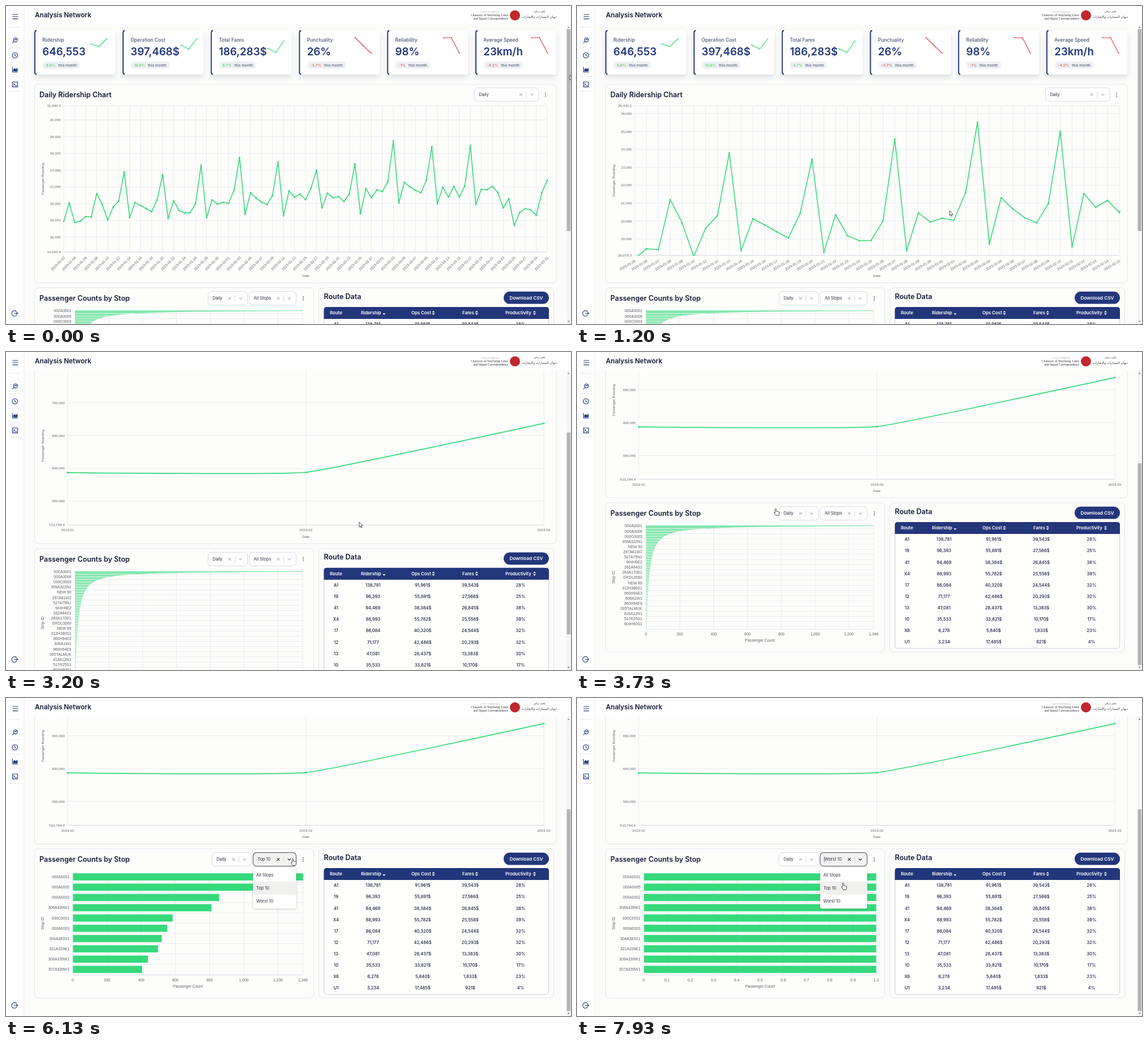
Animation of 998 by 561 pixels, one loop 8000 ms. Source, as an HTML page:

```html
<!DOCTYPE html>
<html lang="en">
<head>
<meta charset="utf-8">
<title>Analysis Network</title>
<style>
  html, body { margin: 0; width: 100%; height: 100%; overflow: hidden; background: #fcfcfb; }
  svg { display: block; width: 100vw; height: 100vh; font-family: Inter, sans-serif; }
  .axis { font-family: "Liberation Sans", Arial, sans-serif; fill: #5f616a; }
  .serif { font-family: "Liberation Serif", serif; fill: #33343c; }
  .arabic { font-family: "DejaVu Sans", sans-serif; fill: #33343c; }
  .card { filter: drop-shadow(0 5px 4px #1b254b22); }
  .menu { filter: drop-shadow(0 1px 2px #0003); }
</style>
</head>
<body>
<svg viewBox="0 0 998 561">
  <defs>
    <clipPath id="page"><rect x="32" y="33" width="958" height="528"/></clipPath>
    <clipPath id="bars"><rect x="118" y="306.5" width="412" height="183"/></clipPath>
    <linearGradient id="fade" x2="0" y2="1">
      <stop stop-color="#36d97b" stop-opacity=".62"/>
      <stop offset=".35" stop-color="#36d97b" stop-opacity=".5"/>
      <stop offset="1" stop-color="#36d97b" stop-opacity=".25"/>
    </linearGradient>
  </defs>
  <rect width="998" height="561" fill="#fcfcfb"/>
  <g clip-path="url(#page)">
    <g id="content">
      <g id="cards"></g>
      <g id="ridership"></g>
      <g transform="translate(0 231)">
        <g id="routes"></g>
        <g id="stops"></g>
      </g>
    </g>
  </g>
  <g id="frame"></g>
  <g id="scrollbar"></g>
  <g id="cursor"></g>
</svg>
<script>
const LOOP = 8000, SCROLL = 231;
const NAVY = '#22367a', INK = '#161b36', GREEN = '#36d97b', RED = '#e0434c', GRID = '#e1e4f0', EDGE = '#e4e6ee';

// Time helpers
const lerp = (a, b, p) => a + (b - a) * p;
const span = (t, a, b) => Math.min(1, Math.max(0, (t - a) / (b - a)));
const smooth = p => p * p * (3 - 2 * p);
const quadOut = p => 1 - (1 - p) ** 2;
const within = (t, a, b) => t >= a && t < b;

// Drawing helpers; text is centred vertically on y
const n = v => +v.toFixed(2);
const text = (x, y, s, size, more = '') =>
  `<text x="${n(x)}" y="${n(y + size * .36)}" font-size="${size}" ${more}>${s}</text>`;
const rect = (x, y, w, h, fill, more = '') =>
  `<rect x="${n(x)}" y="${n(y)}" width="${n(w)}" height="${n(h)}" fill="${fill}" ${more}/>`;
const path = (d, color, width = 1, more = '') =>
  `<path d="${d}" fill="none" stroke="${color}" stroke-width="${width}" ${more}/>`;
const line = (x1, y1, x2, y2, color = GRID, width = .7) =>
  path(`M${n(x1)} ${n(y1)}L${n(x2)} ${n(y2)}`, color, width);
const dot = (x, y, r, fill) => `<circle cx="${n(x)}" cy="${n(y)}" r="${r}" fill="${fill}"/>`;
const poly = pts => 'M' + pts.map(p => p.map(n).join(' ')).join('L');
const panel = (x, y, w, h) => rect(x, y, w, h, '#fdfdfb', `rx="7" stroke="${EDGE}"`);
const heading = (x, y, s) => text(x, y, s, 12.5, `font-weight="600" fill="${INK}"`);
const axis = (x, y, s, anchor, size = 6.24, more = '') =>
  text(x, y, s, size, `class="axis" text-anchor="${anchor}" ${more}`);
const upright = (x, y, s, size) => axis(x, y, s, 'middle', size, `transform="rotate(-90 ${x} ${y})"`);
const kebab = (x, y) => [-3, 0, 3].map(d => dot(x, y + d, .85, '#4a4f63')).join('');
const num = v => v.toLocaleString('en-US', { maximumFractionDigits: 2 });

const cache = {};
function put(id, html) {
  if (cache[id] !== html) document.getElementById(id).innerHTML = cache[id] = html;
}

function select(x, w, y, label, focus, caret) {
  const r = x + w, c = focus ? '#33353f' : '#b4b8c6';
  return rect(x, y - 12, w, 24, focus ? '#f2f2f1' : '#fefefe',
      `rx="6" stroke="${focus ? '#6b6d76' : '#d3d6e2'}" stroke-width="${focus ? 1.3 : .9}"`) +
    text(x + 8, y, label, 7.4, 'fill="#2c3040"') +
    (caret ? line(x + 7.5, y - 4.5, x + 7.5, y + 4.5, '#222', .7) : '') +
    path(`M${r - 34} ${y - 2.4}l4.8 4.8m0 -4.8l-4.8 4.8`, c, 1.1) +
    line(r - 22, y - 5.5, r - 22, y + 5.5, '#cfd2dd', .8) +
    path(`M${r - 14.7} ${y - 1.2}l2.6 2.6l2.6 -2.6`, c, 1.2);
}

function menu(x, w, y, items, hot) {
  return `<g class="menu">${rect(x, y, w, items.length * 22.8 + 4, '#fff', 'rx="3"')}</g>` +
    items.map((s, i) => {
      const cy = y + 13.4 + i * 22.8;
      return (i === hot ? rect(x, cy - 11.4, w, 22.8, '#f0f0ef') : '') +
        text(x + 5.5, cy, s, 7.4, 'fill="#2c3040"');
    }).join('');
}

// Summary cards: label, value, change, pill width, sparkline heights and offset
const cards = [
  ['Ridership', '646,553', '8.6%', 65.5, [67, 71.5, 58], 100],
  ['Operation Cost', '397,468$', '10.8%', 68.5, [69, 76, 58], 103],
  ['Total Fares', '186,283$', '8.7%', 65, [75, 82, 62], 101],
  ['Punctuality', '26%', '-3.7%', 68, [56, 70, 83], 99.5],
  ['Reliability', '98%', '-1%', 61, [56, 56, 83], 99.5],
  ['Average Speed', '23km/h', '-4.2%', 68.5, [56, 56, 83], 99.5],
];
function drawCards() {
  return cards.map(([label, value, change, pill, ys, dx], i) => {
    const x = 50 + i * 155.8, color = change[0] === '-' ? RED : GREEN;
    const pts = ys.map((y, k) => [x + dx + k * 14, y]);
    return `<g class="card">${rect(x, 43, 143, 78, '#fff', 'rx="4"')}</g>` +
      path(`M${n(x + 4)} 43.5Q${n(x + 1)} 43.5 ${n(x + 1)} 47V117Q${n(x + 1)} 120.5 ${n(x + 4)} 120.5`, NAVY, 1.9) +
      text(x + 14.3, 60, label, 8.5, 'font-weight="500" fill="#4b5372"') +
      text(x + 14.3, 80.7, value, 18.7, `font-weight="600" fill="${NAVY}"`) +
      rect(x + 15, 98, pill, 12.5, '#eef0f4', 'rx="5"') +
      text(x + 20.5, 104.2, `<tspan font-weight="600" fill="${change[0] === '-' ? '#e26a62' : '#68cf76'}">${change}</tspan>` +
        '<tspan dx="5">this month</tspan>', 6.5, 'font-weight="500" fill="#596079"') +
      path(poly(pts), color, 1.2) + pts.map(p => dot(...p, 1.1, color)).join('');
  }).join('');
}

// Daily boardings in tens, from 2 January to 31 March
const daily = [
  1790, 2010, 1775, 1790, 1845, 1840, 2120, 1990, 1803, 1960, 2030, 2380, 1835, 2013, 1978, 1940,
  1905, 2045, 2345, 1825, 2035, 1918, 1890, 1892, 2000, 2458, 1835, 2045, 1995, 2015, 2004, 2160,
  2552, 1872, 2130, 2067, 2018, 1990, 2098, 2500, 1856, 2153, 2077, 2115, 2048, 2185, 2398, 1950,
  2125, 2070, 2085, 2025, 2120, 2475, 1880, 2180, 2070, 2165, 2145, 2265, 2750, 2010, 2255, 2200,
  2160, 2130, 2280, 2680, 2000, 2195, 2080, 2205, 2080, 2210, 2695, 1990, 2170, 2165, 2205, 2135,
  1950, 2060, 1740, 1895, 1940, 1925, 1860, 2130, 2280];
const dayName = i => new Date(Date.UTC(2023, 0, 2 + i)).toISOString().slice(0, 10);

function yAxis(lo, hi, step, left, right, bottom) {
  const Y = v => lerp(bottom, 176, (v - lo) / (hi - lo));
  let out = '';
  const tick = v => {
    out += line(left, Y(v), right, Y(v)) + axis(left - 5.3, Y(v), num(v), 'end');
  };
  tick(lo);
  tick(hi);
  for (let v = Math.ceil(lo / step) * step; v < hi; v += step)
    if (Math.min(bottom - Y(v), Y(v) - 176) > 8) tick(v);
  out += line(left, bottom, right, bottom, '#cdd0da') + upright(65, (176 + bottom) / 2, 'Passenger Boarding', 6.24);
  return [Y, out];
}

function dailyChart(t) {
  const z = smooth(span(t, 700, 1150));
  const a = lerp(0, 3, z), b = lerp(88, 44, z), wide = b - a > 60, skip = wide ? 2 : 1;
  const left = 102, right = lerp(956, 958, z), bottom = wide ? 434 : 440;
  const lo = Math.round(lerp(142204, 180793, z)) / 10, hi = Math.round(lerp(316904, 264351, z)) / 10;
  const X = i => lerp(left, right, (i - a) / (b - a));
  let [Y, out] = yAxis(lo, hi, hi - lo > 12000 ? 2000 : 1000, left, right, bottom);
  for (let i = Math.ceil(a / skip) * skip; i <= b + .01; i += skip) {
    const x = n(X(i)), y = bottom + 9;
    out += line(x, 176, x, bottom) +
      axis(x + 1, y, dayName(i), 'end', 6.24, `transform="rotate(${wide ? -45 : -30} ${x + 1} ${y})"`);
  }
  const pts = daily.map((v, i) => [X(i), Y(v * 10)]);
  return out + `<clipPath id="plot">${rect(left - 1.5, 174, right - left + 3, bottom - 173, '#000')}</clipPath>` +
    `<g clip-path="url(#plot)">${path(poly(pts), GREEN, 1.6, 'stroke-linejoin="round"')}` +
    pts.map(p => dot(...p, 1.5, GREEN)).join('') + '</g>';
}

function monthlyChart(t) {
  let [, out] = yAxis(513794.4, 754919.02, 50000, 109, 950, 455.5);
  [109, 529.7, 950].forEach((x, i) => {
    out += line(x, 176, x, 455.5) + axis(x, 464.5, `2023-0${i + 1}`, 'middle');
  });
  const p = span(t, 2400, 3000);
  const y0 = lerp(346, 363.2, p), x1 = lerp(150, 530, p), y1 = lerp(361.9, 362.6, p);
  const x2 = lerp(x1, 950, p * p), y2 = lerp(y1, 276.2, p * p);
  // Only the middle point has handles, along the line between its neighbours
  const hx = (x2 - 109) * .05 * p, hy = (y2 - y0) * .05 * p;
  const d = `M109 ${n(y0)}C109 ${n(y0)} ${n(x1 - hx)} ${n(y1 - hy)} ${n(x1)} ${n(y1)}` +
    `C${n(x1 + hx)} ${n(y1 + hy)} ${n(x2)} ${n(y2)} ${n(x2)} ${n(y2)}`;
  return out + path(d, GREEN, 1.7) + [[109, y0], [x1, y1], [x2, y2]].map(q => dot(...q, 1.6, GREEN)).join('');
}

function drawRidership(t) {
  const kind = t < 2400 ? 'Daily' : 'Monthly', open = within(t, 2030, 2400);
  return panel(50.5, 138, 921.5, 350.5) + heading(59, 156, kind + ' Ridership Chart') + kebab(953, 156.3) +
    (t < 2400 ? dailyChart(t) : monthlyChart(t)) + axis(529.5, 475.7, 'Date', 'middle') +
    select(827.5, 113.5, 156.2, kind, within(t, 2030, 4300)) +
    (open ? menu(827.5, 113.5, 170.7, ['Daily', 'Monthly'], t < 2230 ? 0 : 1) : '');
}

// Stop chart
const allStops = ('000A0001,000A0006,000C0003,309A322N1,NEW 90,297A81W2,527A79N1,904H6E2,262A64S1,263A170E1,' +
  'GRDL0060,NEW 89,312H380S1,960H94E3,608A1W1,960H94E9,005TALMUK,816A12N1,517R25S1,604H60S1').split(',');
const topStops = '000A0001,000A0005,000A0002,306A339W1,000C0001,000A0003,304A383S1,321A339E1,308A339W1,307A339W1'.split(',');
const topCounts = [1346, 1160, 855, 810, 583, 551, 519, 498, 439, 404];

function stopGrid(left, right, max, step, names, first, pitch, labelX) {
  let out = '';
  names.forEach((s, i) => {
    const y = first + pitch * i;
    out += line(left, y + pitch / 2, right, y + pitch / 2) + axis(labelX, y, s, 'end', 6.8);
  });
  const ticks = [];
  for (let v = 0; v < max - step / 4; v += step) ticks.push(v);
  [...ticks, max].forEach(v => {
    const x = lerp(left, right, v / max);
    out += line(x, 306.5, x, 489) +
      axis(x, 497.3, max > 1 ? num(v) : v ? v.toFixed(1) : '0', 'middle', 6.8);
  });
  return out + line(left, 489, right, 489, '#d5d8e2') +
    axis((left + right) / 2, 508.3, 'Passenger Count', 'middle', 6.8) + upright(65, 397.5, 'Stop ID', 6.8);
}

function allChart() {
  const width = y => Math.max(.2, 402 / (1 + .62 * (y - 307)) - (y - 307) / 60);
  const edge = [];
  for (let y = 307; y <= 488; y += y < 330 ? .5 : 4) edge.push([122 + width(y), y]);
  let stripes = '';
  for (let y = 311.5; y < 480; y += 4.55) stripes += line(122, y, 122 + width(y), y, '#fdfdfb', .8);
  return stopGrid(122, 524, 1346, 200, allStops, 307, 9.1, 115.3) +
    `<path d="${poly([[122, 306], [524, 306], ...edge, [122, 488]])}Z" fill="url(#fade)"/>` + stripes;
}

function rankChart(t) {
  const worst = t >= 6550, e = quadOut(span(t, 4990, 5362)), g = quadOut(span(t, 6550, 7150));
  const bars = topCounts.map((v, i) => {
    const y = 315.6 + 18.13 * i - (1 - e) * (93 + 18.13 * i), h = 12.6 * e;
    return rect(118.3, y - h / 2, lerp(v * .302, 410.2, g), h, GREEN);
  }).join('');
  return (worst ? stopGrid(118, 528.5, 1, .1, topStops, 315.6, 18.13, 112)
    : stopGrid(118, 524.5, 1346, 200, topStops, 315.6, 18.13, 112)) + `<g clip-path="url(#bars)">${bars}</g>`;
}

function drawStops(t) {
  const top = within(t, 4990, 6550), label = t < 4990 ? 'All Stops' : top ? 'Top 10' : 'Worst 10';
  const x = top ? 436.5 : 429.5, w = 512.5 - x;
  const open = within(t, 4320, 4990) || within(t, 6010, 6550) || t >= 7220;
  const hot = t < 4990 ? (t < 4700 ? 0 : 1) : t < 6550 ? (t < 6350 ? 1 : 2) :
    t < 7380 ? 2 : t < 7480 ? 1 : t < 7870 ? 0 : 1;
  return panel(50.5, 266, 493, 263) + heading(59, 284.5, 'Passenger Counts by Stop') + kebab(525, 284.7) +
    (t < 4990 ? allChart() : rankChart(t)) +
    select(top ? 364 : 357, 69.5, 284.7, 'Daily') + select(x, w, 284.7, label, t >= 4320, t >= 7220) +
    (open ? menu(x, w, 299.2, ['All Stops', 'Top 10', 'Worst 10'], hot) : '');
}

// Route table
const routes = `A1 138,781 91,961$ 39,543$ 28%|19 96,393 55,891$ 27,566$ 25%|41 94,469 38,384$ 26,845$ 38%
X4 88,993 55,782$ 25,558$ 39%|17 86,084 40,320$ 24,544$ 32%|12 71,177 42,486$ 20,293$ 32%
13 47,081 28,437$ 13,383$ 30%|10 35,533 33,821$ 10,170$ 17%|X6 6,278 5,840$ 1,833$ 23%
U1 3,234 17,485$ 921$ 4%`.split(/[|\n]/).map(r => r.split(' '));

function drawRoutes() {
  const cols = [583, 648.3, 736, 820, 909];
  const heads = [['Route', 572], ['Ridership', 627, 667.8], ['Ops Cost', 716, 755], ['Fares', 806, 831.3], ['Productivity', 882, 933.5]];
  const down = x => `<path d="M${x - 2.6} 311.3h5.2l-2.6 2.8z" fill="#fff"/>`;
  const up = x => `<path d="M${x - 2.6} 309.5h5.2l-2.6 -2.8z" fill="#fff"/>`;
  return panel(552.5, 266, 415, 263) + heading(561.5, 281, 'Route Data') +
    rect(879, 272.8, 80, 21.8, NAVY, 'rx="10.9"') +
    text(919, 283.8, 'Download CSV', 8.2, 'font-weight="600" fill="#fff" text-anchor="middle"') +
    rect(561.7, 300.5, 397, 222.5, '#fefefd', 'rx="5" stroke="#c9cddd"') +
    `<path d="M561.5 321V305q0 -5 5 -5H954q5 0 5 5V321Z" fill="${NAVY}"/>` +
    heads.map(([s, x, icon], i) => text(x, 310.5, s, 7.8, 'font-weight="600" fill="#fff"') +
      (icon ? down(icon) + (i > 1 ? up(icon) : '') : '')).join('') +
    routes.map((row, r) => row.map((s, c) =>
      text(cols[c], 330.6 + r * 20.12, s, 7.5, `font-weight="500" fill="${INK}" text-anchor="middle"`)).join('')).join('');
}

function drawFrame() {
  const icon = (d, more) => path(d, NAVY, 1.1, `stroke-linecap="round" ${more || ''}`);
  return rect(32, 0, 966, 33, '#fefefe') + rect(0, 0, 32, 561, '#fefefe') + line(32, 0, 32, 561, '#eeeff4', 1) +
    text(51, 16.2, 'Analysis Network', 11.7, `font-weight="600" fill="${INK}"`) +
    [37.5, 73.5, 99, 124.5, 150.5].map(y => line(5, y, 27, y, '#e2e4ec')).join('') +
    icon('M12 15H21M12 18.8H21M12 22.6H21') +
    icon('M20.3 59.8a3.6 3.6 0 1 1 -7.2 0a3.6 3.6 0 1 1 7.2 0M14 62.6L11.6 65.2M15 60l1.4 -1.4l1.2 1.2l1.4 -1.6') +
    icon('M20.6 87a4.8 4.8 0 1 1 -9.6 0a4.8 4.8 0 1 1 9.6 0M15.8 84.2V87.2L17.8 88.4') +
    icon('M11.5 108V116.5H20.6') + `<path d="M12.8 115.3V112l2.4 -2.4l2.2 1.8l3 -2.6v6.5z" fill="${NAVY}"/>` +
    icon('M11.5 134H20.5V142.6H11.5ZM13.5 136.6l1.8 1.7l-1.8 1.7M16.6 140.4h2') +
    icon('M18.6 539a4.9 4.9 0 1 0 0 6.6M14.6 542.3H20.6M18.8 540.5l1.9 1.8l-1.9 1.8') +
    text(855, 10, 'COUNTY OF MERRALEN', 2.9, 'class="serif" text-anchor="middle"') +
    text(887, 16.3, 'Chancery of Wayfaring Lines', 5.6, 'class="serif" text-anchor="end"') +
    text(887, 22.3, 'and Signal Correspondence', 5.6, 'class="serif" text-anchor="end"') +
    dot(899, 16.5, 9, '#c1272d') +
    text(942, 10, 'إقليم مرالين', 4, 'class="arabic" text-anchor="middle"') +
    text(942, 19, 'ديوان المسارات والإشارات', 5.6, 'class="arabic" text-anchor="middle"');
}

function drawScrollbar(s) {
  return rect(990, 33, 8, 528, '#f5f5f6') + rect(990.5, 41 + s / SCROLL * 155.3, 6.6, 356, '#b3b3b8') +
    `<path d="M991.7 38.6h4l-2 -2.4zM991.7 555.6h4l-2 2.4z" fill="#777"/>`;
}

// Pointer stops: time, x, y of the tip
const stops = [
  [70, 996, 122], [600, 658, 361], [1450, 658, 361], [1730, 820, 260], [1980, 905, 153], [2080, 905, 153],
  [2320, 857, 206], [2700, 857, 206], [3150, 640, 300], [3500, 360, 300], [3730, 351, 276.5], [4180, 490, 282],
  [4380, 490, 282], [4800, 438, 331], [5400, 438, 331], [5920, 506.5, 283.5], [6150, 506.5, 283.5], [6460, 470, 356],
  [6620, 470, 356], [7130, 500, 283], [7260, 500, 283], [7560, 476, 308], [7800, 476, 308], [7870, 470, 326.5]];
const handTimes = [[1930, 2410], [3650, 5010], [5720, 6570], [6980, LOOP]];

function drawCursor(t) {
  let i = stops.findIndex(s => s[0] > t);
  if (i < 0) i = stops.length;
  const a = stops[Math.max(0, i - 1)], b = stops[Math.min(stops.length - 1, i)];
  const p = a === b ? 0 : smooth(span(t, a[0], b[0]));
  const hand = handTimes.some(h => within(t, ...h));
  const d = hand
    ? 'M-1 1Q-1 -.2 0 -.2Q1 -.2 1 1V4.6Q2.1 3.9 2.9 4.9Q4 4.3 4.7 5.3Q6.2 5 6.2 6.6V8.6Q6.2 10 5.2 11.8H.3L-2.9 7.6Q-3.2 6.3 -2 6.3L-1 7.2Z'
    : 'M0 0V8.8L2 7L3.4 10.1L4.8 9.5L3.4 6.5H6.1Z';
  return `<path transform="translate(${n(lerp(a[1], b[1], p))} ${n(lerp(a[2], b[2], p))})" d="${d}" ` +
    'fill="#fff" stroke="#222" stroke-width=".8" stroke-linejoin="round"/>';
}

put('cards', drawCards());
put('routes', drawRoutes());
put('frame', drawFrame());

function render(t) {
  const scroll = SCROLL * smooth(span(t, 2900, 3400));
  document.getElementById('content').setAttribute('transform', `translate(0 ${n(-scroll)})`);
  put('ridership', drawRidership(t));
  put('stops', drawStops(t));
  put('scrollbar', drawScrollbar(scroll));
  put('cursor', drawCursor(t));
}

const start = performance.now();
function tick() {
  render((performance.now() - start) % LOOP);
  requestAnimationFrame(tick);
}
tick();
</script>
</body>
</html>
```
